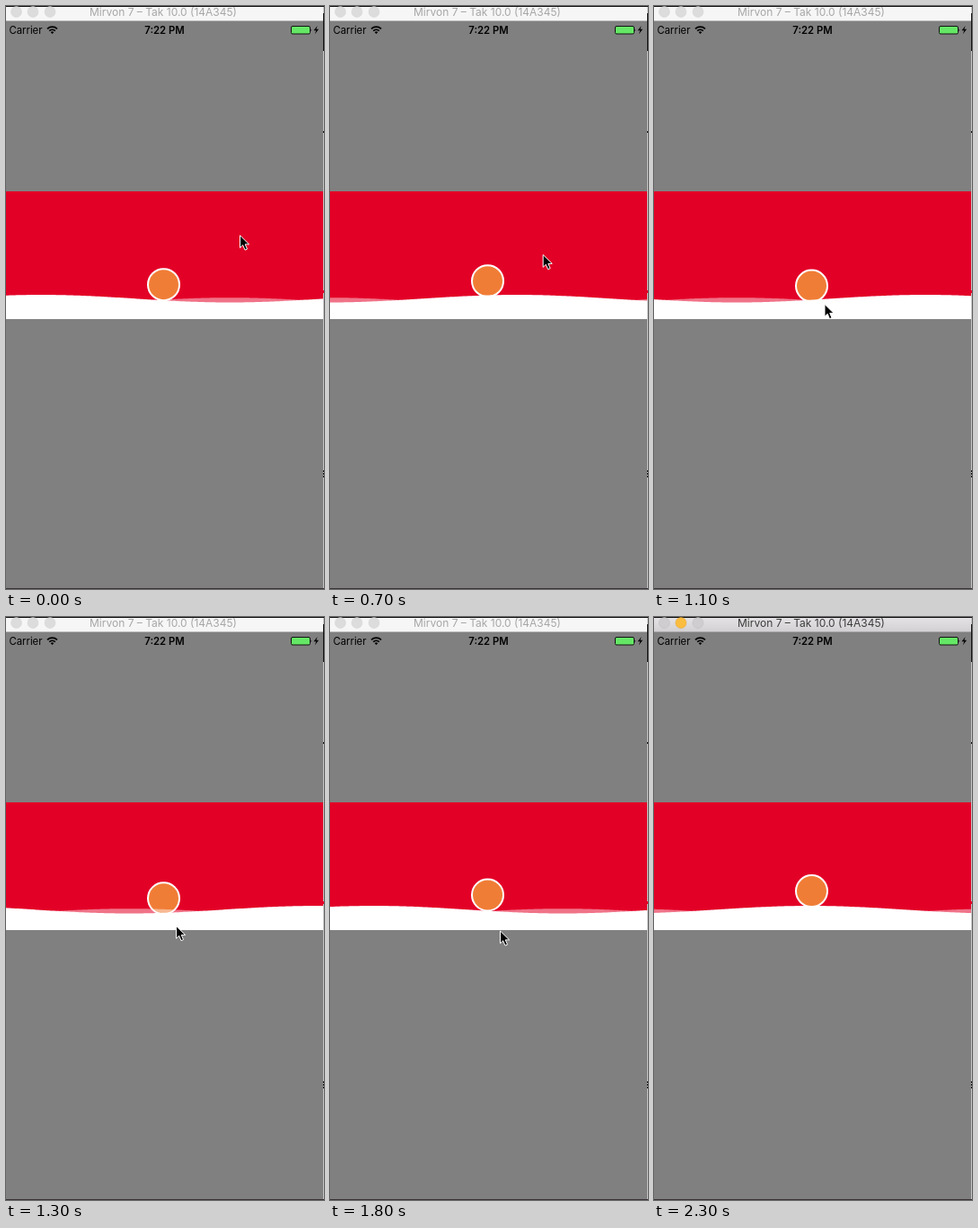
Recreate the animation shown at these times as an HTML page. Size 354x648 px, loop 2.4 s.

```html
<!DOCTYPE html>
<html lang="en">
<head>
<meta charset="utf-8">
<title>Wave header</title>
<style>
  html, body { margin: 0; width: 100%; height: 100%; overflow: hidden; background: #808080; }
  svg { display: block; width: 354px; height: 648px; }
  text { font-family: Inter, Roboto, sans-serif; }
</style>
</head>
<body>
<svg viewBox="0 0 354 648">
  <defs>
    <linearGradient id="activeBar" x1="0" y1="0" x2="0" y2="1">
      <stop offset="0" stop-color="#e5e3e5"/>
      <stop offset="1" stop-color="#d2d0d2"/>
    </linearGradient>
  </defs>
  <rect width="354" height="648" fill="#808080"/>

  <!-- Window title -->
  <rect id="bar" width="353" height="16.5"/>
  <rect width="354" height="1" fill="#111"/>
  <g id="lights">
    <circle cx="11.5" cy="6.5" r="6"/>
    <circle cx="30" cy="6.5" r="6"/>
    <circle cx="49" cy="6.5" r="6"/>
  </g>
  <text id="title" x="175" y="11" font-size="12" text-anchor="middle">Mirvon 7 – Tak 10.0 (14A345)</text>

  <!-- Status bar -->
  <text x="3.5" y="31" font-size="11.3">Carrier</text>
  <text x="176.5" y="31" font-size="11.3" font-weight="600" text-anchor="middle">7:22 PM</text>
  <g fill="none" stroke="#000" stroke-width="1.7">
    <path d="M46 25.4a8 8 0 0 1 11 0"/>
    <path d="M48.2 27.7a4.8 4.8 0 0 1 6.6 0"/>
  </g>
  <path d="M49.7 29.2a2.6 2.6 0 0 1 3.6 0L51.5 31z"/>
  <rect x="317.5" y="22.5" width="21" height="8.5" rx="1.5" fill="#65e766" stroke="#111"/>
  <path d="M339.5 25.2q1.5 1.5 0 3z"/>
  <path d="M346.6 22l-4.1 5.3h2.7l-1.3 4 4.2-5.5h-2.7z"/>

  <!-- Header with waves -->
  <rect y="206" width="353" height="142" fill="#e30027"/>
  <circle id="ball" cx="175.5" r="17.5" fill="#f07d36" stroke="#fff" stroke-width="2"/>
  <path id="backWave" fill="#fff" fill-opacity=".45"/>
  <path id="frontWave" fill="#fff"/>

  <!-- Desktop showing past the window edge -->
  <rect x="353" y="1" width="1" height="647" fill="#c4c4c4"/>
  <path d="M353.5 8V50M353.5 139v2M353.5 516v2M353.5 519v2M353.5 522v2" stroke="#111"/>
  <path d="M353.5 316v3" stroke="#e30027"/>
  <rect y="647" width="354" height="1" fill="#3a3339"/>

  <path id="cursor" d="M.5 .5V14.3L3.7 11.3 6 16.7 8.5 15.6 6.2 10.4H10.6Z" fill="#000" stroke="#fff" stroke-width="1"/>
</svg>
<script>
  const LOOP = 2400, STEP = 100;
  const WIDTH = 353, FLOOR = 348, LENGTH = 420, AMP = 4.25;
  const FRONT_Y = 325.25, BACK_Y = 328.4;
  const BALL_Y = 308.75, FLOAT_X = 158;

  // [time, value]
  const crestKeys = [[0, 39], [400, 135], [900, 257], [1300, 347], [1600, 420], [2000, 517], [2300, 594]];
  const cursorX = [[600, 260], [900, 190], [1300, 189]];
  const cursorY = [[600, 254.5], [900, 319], [1300, 343], [1600, 348.5]];

  const $ = id => document.getElementById(id);
  const lights = [...$('lights').children];

  function tween(keys, t) {
    if (t <= keys[0][0]) return keys[0][1];
    for (let i = 1; i < keys.length; i++) {
      const [t0, a] = keys[i - 1], [t1, b] = keys[i];
      if (t <= t1) return a + (b - a) * (t - t0) / (t1 - t0);
    }
    return keys[keys.length - 1][1];
  }

  const swell = (x, crest) => AMP * Math.cos(2 * Math.PI * (x - crest) / LENGTH);

  function wavePath(mid, crest) {
    let d = `M0 ${FLOOR}`;
    for (let x = 0; x <= WIDTH + 1; x += 2) {
      const px = Math.min(x, WIDTH);
      d += `L${px} ${(mid - swell(px, crest)).toFixed(2)}`;
    }
    return d + `V${FLOOR}Z`;
  }

  function setActive(active) {
    $('bar').setAttribute('fill', active ? 'url(#activeBar)' : '#f6f6f6');
    $('title').setAttribute('fill', active ? '#3c3c3c' : '#a6a6a6');
    lights.forEach((light, i) => {
      light.setAttribute('fill', !active ? '#dcdcdc' : i === 1 ? '#fbbd3f' : '#cfcdcf');
      light.setAttribute('stroke', !active ? '#d2d2d2' : i === 1 ? '#dfa035' : '#bdbbbd');
      light.setAttribute('stroke-width', .5);
    });
    $('cursor').setAttribute('visibility', active ? 'hidden' : 'visible');
  }

  function render(time) {
    const t = Math.floor(time % LOOP / STEP) * STEP;
    const crest = tween(crestKeys, t);
    $('frontWave').setAttribute('d', wavePath(FRONT_Y, crest));
    $('backWave').setAttribute('d', wavePath(BACK_Y, crest + LENGTH / 2));
    $('ball').setAttribute('cy', BALL_Y - swell(FLOAT_X, crest));
    $('cursor').setAttribute('transform', `translate(${tween(cursorX, t)} ${tween(cursorY, t)})`);
    setActive(t >= 2300);
  }

  const start = performance.now();
  function tick() {
    render(performance.now() - start);
    requestAnimationFrame(tick);
  }
  tick();
</script>
</body>
</html>
```
